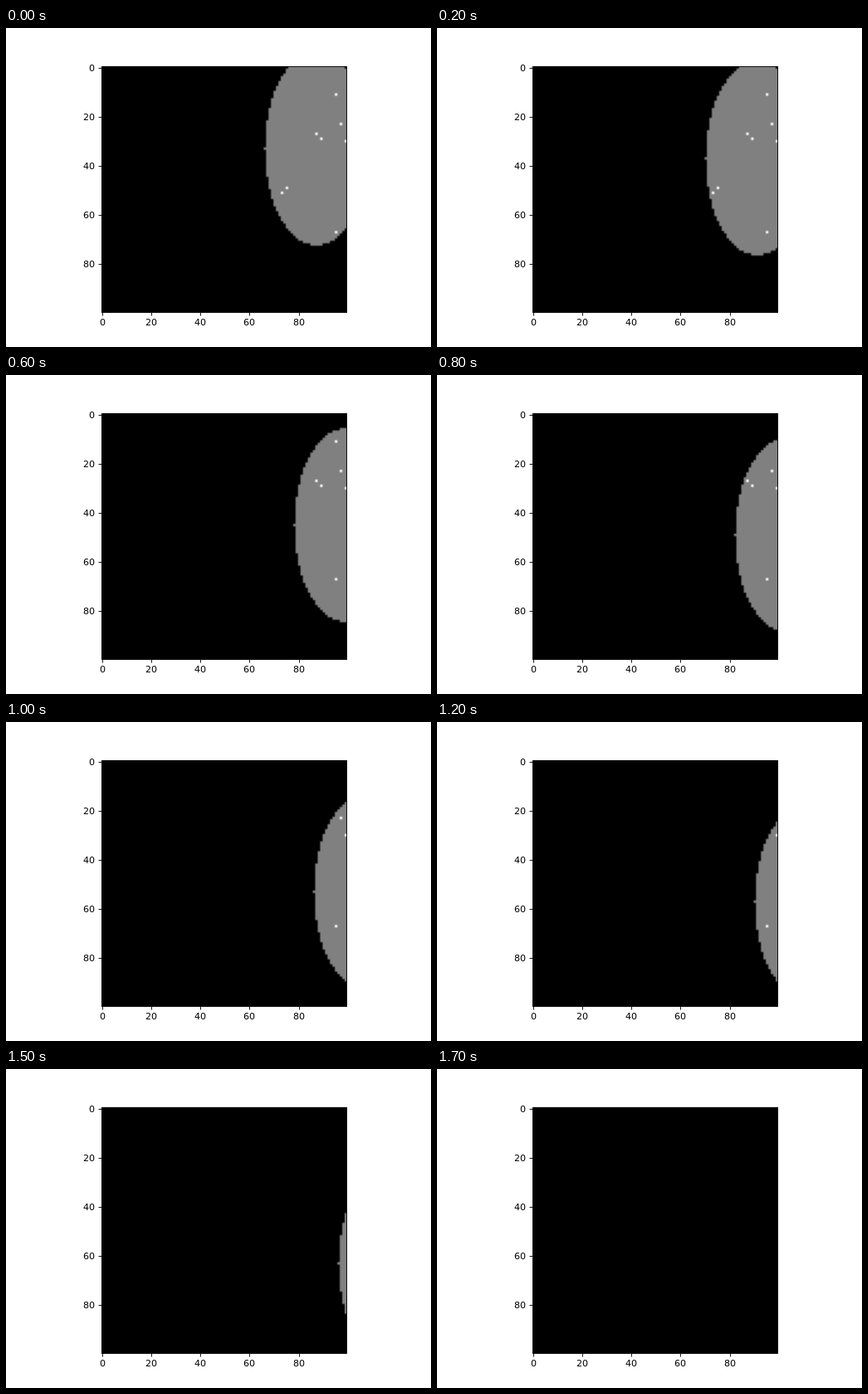
Animation, 512 px wide and 384 px high, one loop 1.92 s. Source, as an HTML page with a canvas:

```html
<!DOCTYPE html>
<html lang="en">
<head>
<meta charset="utf-8">
<title>Moving ellipse</title>
<style>
html, body { margin: 0; width: 100%; height: 100%; overflow: hidden; background: #fff; }
canvas { display: block; }
</style>
</head>
<body>
<canvas id="stage" width="512" height="384"></canvas>
<script>
const ctx = document.getElementById('stage').getContext('2d');
const LOOP = 1920, STEP = 100, LAST_STEP = 17;
const GRID = 100, SIZE = 296, LEFT = 115, TOP = 46;
const CELL = SIZE / GRID;
const INK = 'rgba(0,0,0,0.89)';
const DOTS = [[95, 11], [97, 23], [87, 27], [89, 29], [99, 30], [75, 49], [73, 51], [95, 67]];

const dotKeys = new Set(DOTS.map(([col, row]) => row * GRID + col));
const field = new Float32Array(GRID * GRID);
const plot = ctx.createImageData(SIZE, SIZE);

// Neighbouring cells and blend weight for each output pixel (raised cosine).
const samples = Array.from({ length: SIZE }, (_, p) => {
  const u = (p + 0.5) / CELL - 0.5;
  const i = Math.floor(u);
  return {
    a: Math.max(i, 0),
    b: Math.min(i + 1, GRID - 1),
    w: 0.5 - 0.5 * Math.cos(Math.PI * (u - i))
  };
});

const mix = (a, b, w) => a + (b - a) * w;

function fillField(step) {
  const cx = 87 + 2 * step, cy = 33 + 2 * step;
  for (let row = 0; row < GRID; row++) {
    for (let col = 0; col < GRID; col++) {
      const inside = ((col - cx) / 21) ** 2 + ((row - cy) / 39.3) ** 2 <= 1;
      const k = row * GRID + col;
      field[k] = !inside ? 0 : dotKeys.has(k) ? 255 : 128;
    }
  }
}

function drawField() {
  let out = 0;
  for (const y of samples) {
    const upper = y.a * GRID, lower = y.b * GRID;
    for (const x of samples) {
      const v = mix(
        mix(field[upper + x.a], field[upper + x.b], x.w),
        mix(field[lower + x.a], field[lower + x.b], x.w),
        y.w
      );
      plot.data[out++] = v;
      plot.data[out++] = v;
      plot.data[out++] = v;
      plot.data[out++] = 255;
    }
  }
  ctx.putImageData(plot, LEFT, TOP);
}

function drawAxes() {
  ctx.fillStyle = INK;
  ctx.fillRect(LEFT, TOP, SIZE, 1);
  ctx.fillRect(LEFT, TOP + SIZE, SIZE, 1);
  ctx.fillRect(LEFT, TOP, 1, SIZE);
  ctx.fillRect(LEFT + SIZE - 1, TOP, 1, SIZE);

  ctx.font = '11.11px "DejaVu Sans", sans-serif';
  ctx.textBaseline = 'alphabetic';
  for (let value = 0; value < GRID; value += 20) {
    const offset = (value + 0.5) * 2.9568;
    const x = Math.round(114.56 + offset), y = Math.round(46.08 + offset);
    ctx.fillStyle = INK;
    ctx.fillRect(x, 342.5, 1, 4);
    ctx.fillRect(111.5, y, 4, 1);
    ctx.fillStyle = '#000';
    const label = String(value), width = 7 * label.length;
    ctx.textAlign = 'left';
    ctx.fillText(label, Math.round(114.56 + offset - width / 2), 358);
    ctx.fillText(label, 107 - width, y + 4);
  }
}

let shown = -1;
function draw(time) {
  const step = Math.min(LAST_STEP, Math.floor((time % LOOP) / STEP));
  if (step !== shown) {
    shown = step;
    ctx.fillStyle = '#fff';
    ctx.fillRect(0, 0, 512, 384);
    fillField(step);
    drawField();
    drawAxes();
  }
}

const start = performance.now();
function tick() {
  draw(performance.now() - start);
  requestAnimationFrame(tick);
}
tick();
</script>
</body>
</html>
```
